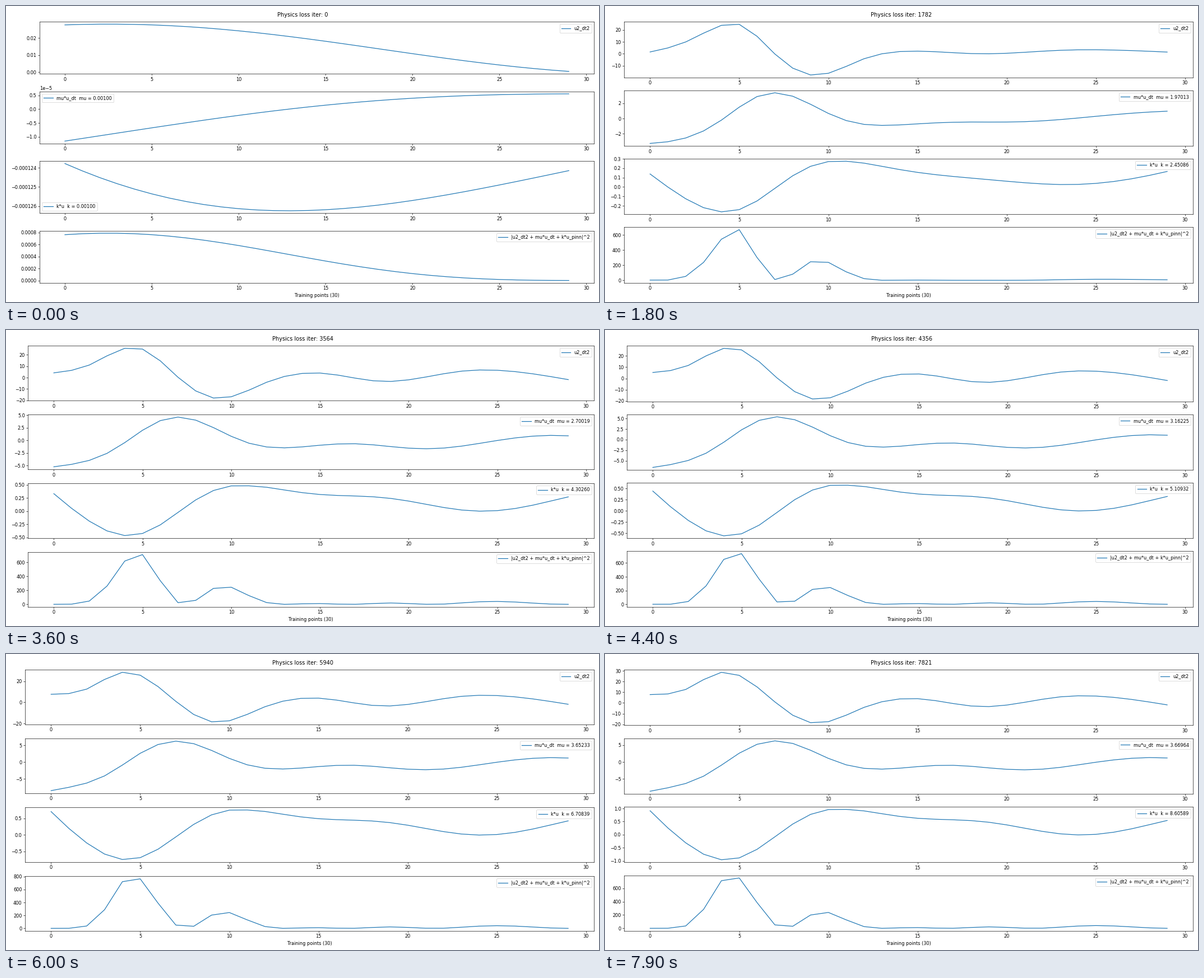
These frames come from a looping animation (1058x529 px, 8000 ms). A matplotlib script:

```python
import numpy as np
import matplotlib.pyplot as plt
from matplotlib.animation import FuncAnimation

FRAMES, INTERVAL, ITER_STEP = 80, 100, 99
STEP = 0.25
T = np.arange(0, 29 + STEP / 2, STEP)  # fine grid over the training points
EVERY = int(1 / STEP)
POINTS = T[::EVERY]

# Learned parameters: friction mu and stiffness k
KEY = [0, 7, 18, 36, 44, 60, 79]
MU = [0.001, 0.98354, 1.97013, 2.70019, 3.16225, 3.65233, 3.66964]
K = [0.001, 1.21005, 2.45086, 4.30260, 5.10932, 6.70839, 8.60589]

# Key points of the acceleration curve after the first fit and when trained
AT = np.array([0, 2, 4, 5, 7, 9, 12, 15, 18.5, 23, 29])
EARLY = np.array([-.1, 9.2, 22.6, 24.4, -.5, -17.6, -4.2, 1.1, 2.05, 1.2, .35])
LATE = np.array([7.8, 12.6, 28.6, 25.75, .95, -18.4, -4.1, 4, -3.4, 5.7, -1.8])


def spline(xs, ys, x):
    """Natural cubic spline through (xs, ys), evaluated at x."""
    n, h = len(xs), np.diff(xs)
    s = np.diff(ys) / h
    a, b = np.eye(n), np.zeros(n)
    for i in range(1, n - 1):
        a[i, i - 1:i + 2] = h[i - 1], 2 * (h[i - 1] + h[i]), h[i]
        b[i] = 6 * (s[i] - s[i - 1])
    m = np.linalg.solve(a, b)
    i = np.clip(np.searchsorted(xs, x, side="right") - 1, 0, n - 2)
    d = x - xs[i]
    slope = s[i] - h[i] * (2 * m[i] + m[i + 1]) / 6
    return ys[i] + d * (slope + d * (m[i] / 2 + d * (m[i + 1] - m[i]) / (6 * h[i])))


def integrate(rate, at, values):
    """Integral of rate, corrected to pass through the given values."""
    area = (rate[1:] + rate[:-1]) / 2 * STEP / T[-1]
    total = np.concatenate([[0], np.cumsum(area)])
    return total + np.interp(T, at, values - np.interp(at, T, total))


def motion(acc, vel_pins, pos_pins):
    vel = integrate(acc, [0, 7, 29], vel_pins)
    pos = integrate(vel, [0, 11, 29], pos_pins)
    return np.array([acc, vel, pos])


def mix(a, b, w):
    return a + (b - a) * w


UNTRAINED = motion(0.0134 + 0.0148 * np.cos(np.pi * (T - 2.5) / 31.5),
                   [-.01155, -.0049, .00554], [-.12378, -.1262, -.12415])


def fitted(n):
    """Fit after n steps: the start steepens slowly, the tail ripples sooner."""
    steep = np.clip((n - 7) / 54, 0, 1)
    ripple = np.clip((n - 7) / 29, 0, 1)
    lift = 4 * ripple * (1 - ripple)
    knots = mix(EARLY, LATE, np.where(AT < 10, steep, ripple))
    knots[-1] += 2 * lift
    return motion(spline(AT, knots, T),
                  [mix(-1.48, -2.35, steep), 1.71, mix(.2, .33, ripple) + .25 * lift],
                  [mix(.044, .106, steep), .112, mix(.0475, .063, ripple) + .015 * lift])


def terms(n):
    """Friction, stiffness and the four plotted curves."""
    w = min(n / 7, 1)
    acc, vel, pos = mix(UNTRAINED, fitted(n), w * w * (3 - 2 * w))[:, ::EVERY]
    mu, k = np.interp(n, KEY, MU), np.interp(n, KEY, K)
    return mu, k, [acc, mu * vel, k * pos, (acc + mu * vel + k * pos) ** 2]


fig, axes = plt.subplots(4, 1, figsize=(18, 9), dpi=58.778)
title = fig.suptitle("Physics loss iter: 0")
lines = [ax.plot(POINTS, POINTS, label="u")[0] for ax in axes]
labels = [ax.legend(loc="best").get_texts()[0] for ax in axes]
axes[-1].set_xlabel("Training points (30)")


def arrange():
    """Tight layout from the default margins, measured at 100 dpi."""
    dpi = fig.dpi
    fig.set_dpi(100)
    fig.subplots_adjust(left=0.125, right=0.9, bottom=0.11, top=0.88, hspace=0.2)
    fig.tight_layout()
    fig.set_dpi(dpi)


def draw(n):
    mu, k, curves = terms(n)
    title.set_text(f"Physics loss iter: {n * ITER_STEP}")
    texts = ["u2_dt2", f"mu*u_dt  mu = {mu:.5f}", f"k*u  k = {k:.5f}",
             "|u2_dt2 + mu*u_dt + k*u_pinn|^2"]
    for ax, line, label, text, curve in zip(axes, lines, labels, texts, curves):
        line.set_ydata(curve)
        label.set_text(text)
        ax.relim()
        ax.autoscale_view()
    arrange()
    return lines


anim = FuncAnimation(fig, draw, frames=FRAMES, interval=INTERVAL, repeat=True,
                     repeat_delay=0, blit=False)
plt.show()
```
